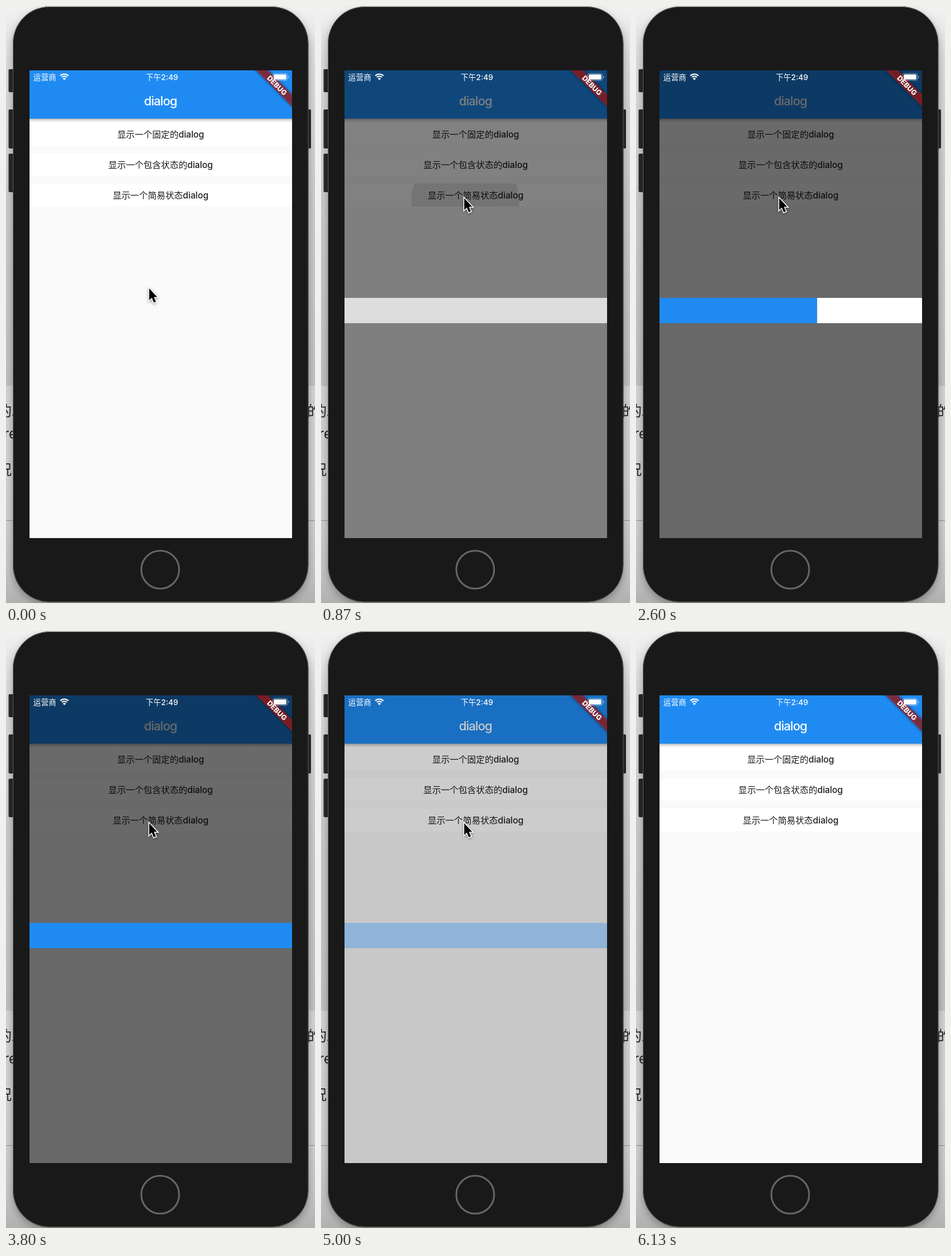
Write an HTML page with a canvas that moves like this. It is 539 px wide and 1039 px high and loops after 6.19 s.

```html
<!DOCTYPE html>
<html lang="zh">
<head>
<meta charset="utf-8">
<title>dialog</title>
<style>
html, body { margin: 0; width: 100%; height: 100%; overflow: hidden; background: #d0d0d0; }
canvas { display: block; width: 539px; height: 1039px; }
</style>
</head>
<body>
<canvas id="stage"></canvas>
<script>
const W = 539, H = 1039, LOOP = 6190;
const SCREEN = { x: 41, y: 112, w: 458, h: 814 };
const BLUE = '#1f8bf2';
const SANS = 'Inter, "Noto Sans CJK SC", "Noto Sans CJK", sans-serif';
const ROWS = ['显示一个固定的dialog', '显示一个包含状态的dialog', '显示一个简易状态dialog'];
const OPEN = 789, CLOSE = 4884, FADE = 150;
const FIRST_TICK = 1310, TICK = 515;
const RIPPLE = 720, CURSOR_GONE = 5700;

const canvas = document.getElementById('stage');
const ctx = canvas.getContext('2d');
const dpr = window.devicePixelRatio || 1;
canvas.width = Math.round(W * dpr);
canvas.height = Math.round(H * dpr);

const clamp = v => Math.min(1, Math.max(0, v));
const span = (t, from, to) => clamp((t - from) / (to - from));

function bezier(x1, y1, x2, y2) {
  const at = (a, b, s) => 3 * a * s * (1 - s) ** 2 + 3 * b * s * s * (1 - s) + s ** 3;
  return x => {
    if (x <= 0 || x >= 1) return clamp(x);
    let lo = 0, hi = 1;
    for (let i = 0; i < 24; i++) {
      const mid = (lo + hi) / 2;
      if (at(x1, x2, mid) < x) lo = mid; else hi = mid;
    }
    return at(y1, y2, lo);
  };
}
const ease = bezier(0.25, 0.1, 0.25, 1);
const easeOut = bezier(0, 0, 0.58, 1);
const easeInOut = bezier(0.42, 0, 0.58, 1);

function rect(x, y, w, h, color) {
  ctx.fillStyle = color;
  ctx.fillRect(x, y, w, h);
}

function roundRect(x, y, w, h, r, color) {
  ctx.beginPath();
  ctx.roundRect(x, y, w, h, r);
  ctx.fillStyle = color;
  ctx.fill();
}

function text(str, x, y, size, weight, color, align = 'center', spacing = 0) {
  ctx.font = `${weight} ${size}px ${SANS}`;
  ctx.letterSpacing = spacing + 'px';
  ctx.textAlign = align;
  ctx.fillStyle = color;
  ctx.fillText(str, x, y);
  ctx.letterSpacing = '0px';
}

function vertical(y0, y1, stops) {
  const g = ctx.createLinearGradient(0, y0, 0, y1);
  stops.forEach(([at, color]) => g.addColorStop(at, color));
  return g;
}

function drawPage() {
  rect(0, 0, W, 661, vertical(0, 661, [
    [0, '#f2f2f2'], [0.15, '#dadada'], [0.5, '#cbcbcb'], [1, '#c0c0c0']]));
  rect(0, 661, W, H - 661, vertical(661, H, [
    [0, '#d3d3d3'], [0.6, '#cfcfcf'], [0.85, '#c4c4c4'], [1, '#b0b0b0']]));
  rect(0, 895, W, 1, '#929292');
  text('的', 10, 714, 24.5, 400, '#222', 'right');
  text('.', 9, 714, 24.5, 400, '#222', 'left');
  text('re', -4, 753, 24.5, 400, '#222', 'left');
  text('况', 10, 816, 24.5, 400, '#222', 'right');
  text('的', 525, 714, 24.5, 400, '#222', 'left');
}

function drawPhone() {
  [[110, 40], [180, 68], [257, 67]].forEach(([y, h]) => roundRect(4.5, y, 10, h, 2, '#292929'));
  roundRect(524, 180, 8, 68, 2, '#292929');
  ctx.save();
  ctx.shadowColor = 'rgba(0,0,0,.3)';
  ctx.shadowBlur = 14 * dpr;
  ctx.shadowOffsetY = 5 * dpr;
  roundRect(12, 1, 515.5, 1036.5, 64, '#191919');
  ctx.restore();
  ctx.beginPath();
  ctx.roundRect(12.5, 1.5, 514.5, 1035.5, 63.5);
  ctx.strokeStyle = '#5c5c5c';
  ctx.lineWidth = 1;
  ctx.stroke();
  ctx.beginPath();
  ctx.arc(269, 981, 33, 0, Math.PI * 2);
  ctx.strokeStyle = '#666';
  ctx.lineWidth = 3;
  ctx.stroke();
}

function drawRipple(t) {
  const alpha = span(t, RIPPLE, RIPPLE + 75) * (1 - span(t, 945, 1320));
  if (!alpha) return;
  const grow = span(t, RIPPLE, 1020);
  ctx.save();
  ctx.beginPath();
  ctx.rect(SCREEN.x, 309, SCREEN.w, 40);
  ctx.clip();
  ctx.beginPath();
  ctx.arc(249 + 20 * grow ** 3, 340, 12 + 324 * grow * grow, 0, Math.PI * 2);
  ctx.fillStyle = `rgba(0,0,0,${0.1 * alpha})`;
  ctx.fill();
  ctx.restore();
}

function drawApp(t) {
  const { x, y, w, h } = SCREEN;
  rect(x, y, w, h, '#fafafa');
  ROWS.forEach((label, i) => {
    const top = 203 + 53.1 * i;
    rect(x, Math.round(top), w, 39.6, '#fff');
    if (i === 2) drawRipple(t);
    text(label, 269.7, top + 25.5, 15.3, 500, '#1c1c1c');
  });
  rect(x, 196, w, 6, vertical(196, 202, [[0, 'rgba(0,0,0,.3)'], [0.4, 'rgba(0,0,0,.12)'], [1, 'rgba(0,0,0,0)']]));
  rect(x, y, w, 84, BLUE);
  text('dialog', 269.5, 173.3, 21.4, 500, '#fff', 'center', -0.8);
}

function drawDialog(t) {
  const p = t < CLOSE ? span(t, OPEN, OPEN + FADE) : 1 - span(t, CLOSE, CLOSE + FADE);
  if (!p) return;
  const { x, y, w, h } = SCREEN;
  rect(x, y, w, h, `rgba(0,0,0,${0.584 * ease(p)})`);
  const steps = Math.min(5, Math.max(0, Math.floor((t - FIRST_TICK) / TICK) + 1));
  const fill = w * steps / 5;
  ctx.globalAlpha = easeOut(p);
  rect(x + fill, 508, w - fill, 44, '#fff');
  rect(x, 508, fill, 44, BLUE);
  ctx.globalAlpha = 1;
}

function drawBanner() {
  ctx.save();
  ctx.translate(SCREEN.x + SCREEN.w, SCREEN.y);
  ctx.rotate(Math.PI / 4);
  ctx.filter = `blur(${2.5 * dpr}px)`;
  rect(-60, 29.8, 120, 14.7, 'rgba(0,0,0,.5)');
  ctx.filter = 'none';
  rect(-60, 29.8, 120, 14.7, 'rgba(183,28,28,.627)');
  text('DEBUG', 0, 41.6, 12.3, 800, '#fff');
  ctx.restore();
}

function drawStatus() {
  text('运营商', 47.5, 128.5, 13.4, 400, '#fff', 'left');
  text('下午2:49', 272, 128.5, 13.4, 500, '#fff');

  ctx.strokeStyle = '#fff';
  ctx.lineWidth = 2.1;
  [6.2, 10].forEach(r => {
    ctx.beginPath();
    ctx.arc(101.8, 128.5, r, -Math.PI * 0.75, -Math.PI * 0.25);
    ctx.stroke();
  });
  ctx.beginPath();
  ctx.moveTo(101.8, 129);
  ctx.arc(101.8, 129, 3.7, -Math.PI * 0.75, -Math.PI * 0.25);
  ctx.fillStyle = '#fff';
  ctx.fill();

  ctx.beginPath();
  ctx.roundRect(465.2, 117.4, 25.6, 12.2, 3);
  ctx.strokeStyle = 'rgba(255,255,255,.5)';
  ctx.lineWidth = 1;
  ctx.stroke();
  roundRect(467, 119.1, 22, 8.8, 1.6, '#fff');
  roundRect(492, 121.5, 1.4, 4, 0.7, 'rgba(255,255,255,.5)');
}

function drawCursor(t) {
  if (t >= CURSOR_GONE) return;
  const y = 491.5 - 157 * easeInOut(span(t, 100, 640));
  const arrow = new Path2D('M0 0V20.5L4.6 16.2L8 24.6L11.6 23.1L8.2 14.9H14Z');
  ctx.save();
  ctx.translate(249.8, y);
  ctx.lineJoin = 'miter';
  ctx.lineWidth = 3;
  ctx.strokeStyle = '#fff';
  ctx.shadowColor = 'rgba(0,0,0,.4)';
  ctx.shadowBlur = 4 * dpr;
  ctx.shadowOffsetY = 1.5 * dpr;
  ctx.stroke(arrow);
  ctx.shadowColor = 'transparent';
  ctx.fillStyle = '#000';
  ctx.fill(arrow);
  ctx.restore();
}

function draw(t) {
  ctx.setTransform(dpr, 0, 0, dpr, 0, 0);
  drawPage();
  drawPhone();
  ctx.save();
  ctx.beginPath();
  ctx.rect(SCREEN.x, SCREEN.y, SCREEN.w, SCREEN.h);
  ctx.clip();
  drawApp(t);
  drawDialog(t);
  drawBanner();
  drawStatus();
  ctx.restore();
  drawCursor(t);
}

const start = performance.now();
function tick() {
  draw((performance.now() - start) % LOOP);
  requestAnimationFrame(tick);
}
tick();
</script>
</body>
</html>
```
